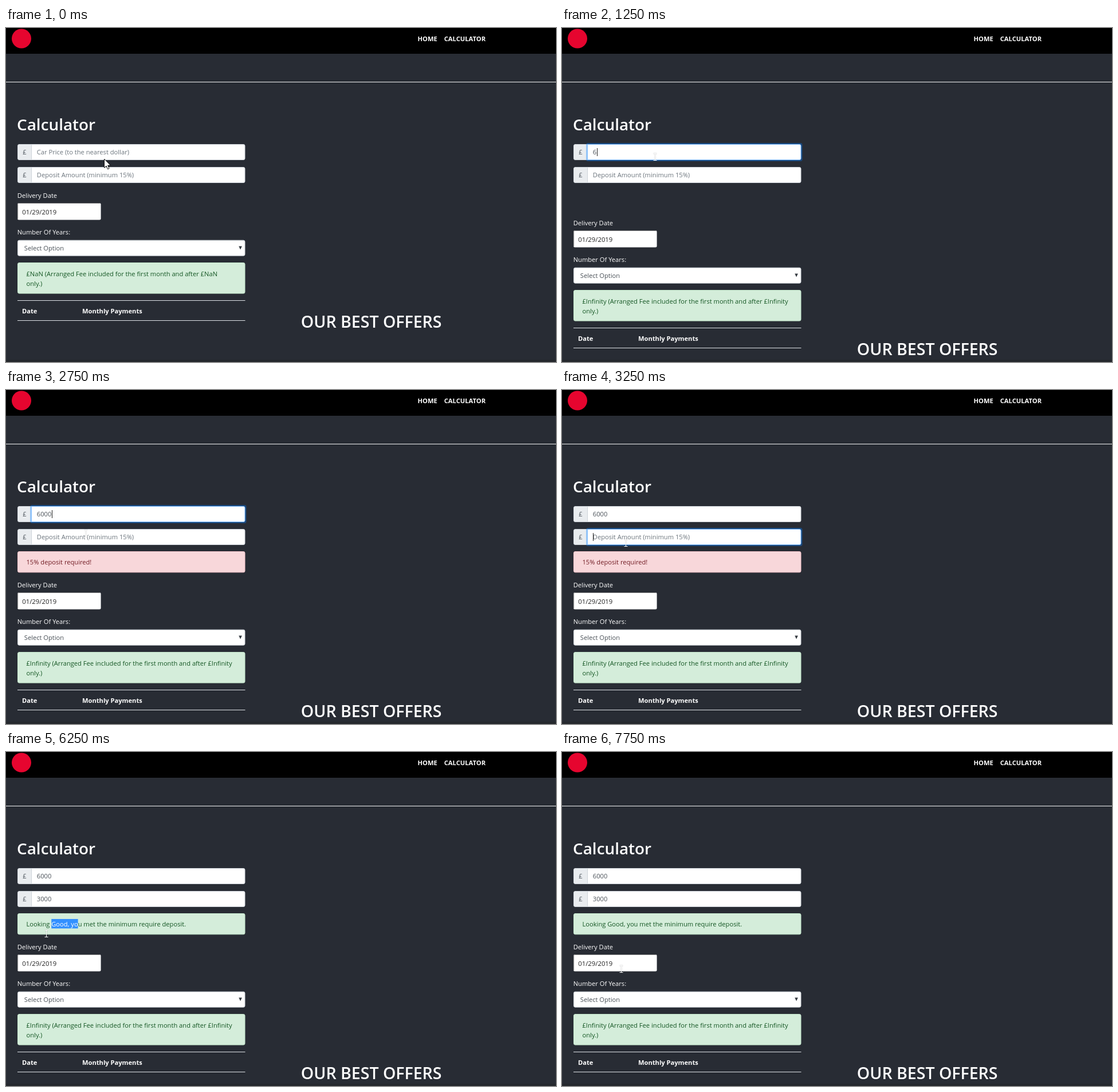
Write an HTML page that moves like this. It is 960x584 px and loops after 8 s.

```html
<!DOCTYPE html>
<html lang="en">
<head>
<meta charset="utf-8">
<title>Calculator</title>
<style>
  html, body { margin: 0; width: 100%; height: 100%; overflow: hidden; background: #282c34; }
  svg { display: block; width: 960px; height: 584px; }
  text { font: 11.15px "Open Sans", "Noto Sans", sans-serif; fill: #fff; white-space: pre; }
  .nav { font-size: 11.2px; font-weight: 700; }
  .title { font-size: 27.9px; font-weight: 600; }
  .bold { font-weight: 700; }
  .value { fill: #495057; }
  .hint { fill: #6c757d; }
  .addon { fill: #e9ecef; stroke: #ced4da; }
  .box { fill: #fff; stroke: #ced4da; }
  .focused .box { stroke: #80bdff; }
  .halo { fill: #007bff; opacity: 0; }
  .focused .halo { opacity: .35; }
  .caret { fill: #222; }
  .rule { fill: #dee2e6; }
  .success { fill: #d4edda; stroke: #c3e6cb; }
  .danger { fill: #f8d7da; stroke: #f5c6cb; }
  .success-text { fill: #155724; }
  .danger-text { fill: #721c24; }
  .selected { fill: #fff; }
</style>
</head>
<body>
<svg viewBox="0 0 960 584">
  <rect width="960" height="584" fill="#282c34"/>
  <rect width="960" height="45" fill="#000"/>
  <circle cx="27" cy="18.5" r="17" fill="#e6052f"/>
  <text class="nav" x="718.5" y="23">HOME</text>
  <text class="nav" x="764.7" y="23">CALCULATOR</text>
  <rect y="94" width="960" height="1" fill="#f4f4f4"/>
  <text class="title" x="19" y="179">Calculator</text>

  <g id="fields"></g>

  <g id="notice">
    <rect id="noticeBox" x="20.5" y="282.5" width="396.5" height="36.3" rx="2.5"/>
    <rect id="selection" y="292" height="16.5" fill="#3390ff"/>
    <text id="noticeText" x="35.5" y="305.3"><tspan></tspan><tspan class="selected"></tspan><tspan></tspan></text>
  </g>

  <g id="lower">
    <text x="19.7" y="296.8">Delivery Date</text>
    <rect x="20" y="306" width="145.6" height="29.4" rx="2.5" fill="#fff"/>
    <path d="M20.7 334V308q0-1.5 1.5-1.5H164" fill="none" stroke="#8d8d8d"/>
    <text x="28.3" y="325.7" style="fill:#222;font-size:11.3px">01/29/2019</text>
    <text x="19.7" y="361">Number Of Years:</text>
    <rect class="box" x="20.5" y="371.2" width="396.5" height="27" rx="2.5"/>
    <text class="value" x="31.8" y="389.3">Select Option</text>
    <path d="M406.3 381.5h5.6l-2.8 6z" fill="#343a40"/>
    <rect class="success" x="20.5" y="410.5" width="396.5" height="53.6" rx="2.5"/>
    <text id="fee" class="success-text" x="35.5" y="433.6"></text>
    <text class="success-text" x="35.5" y="451.3">only.)</text>
    <rect class="rule" x="20" y="476" width="397.5" height="1"/>
    <text class="bold" x="28" y="498.6">Date</text>
    <text class="bold" x="133" y="498.6">Monthly Payments</text>
    <rect class="rule" x="20" y="511" width="397.5" height="1"/>
    <text class="title" x="514.8" y="523.6" style="font-size:28.5px">OUR BEST OFFERS</text>
  </g>
  <rect y="580" width="960" height="4" fill="#25282d"/>

  <g id="pointer">
    <path id="arrow" d="M0 0V15.5L3.6 12.2 6 17.8 8.6 16.7 6.2 11.2H11z" fill="#fff" stroke="#000" stroke-width=".9"/>
    <g id="beam" fill="none" transform="translate(.5 .5)">
      <path d="M-3-6H3M0-6V6M-3 6H3" stroke="#000" stroke-opacity=".18" stroke-width="2"/>
      <path d="M-3-6H3M0-6V6M-3 6H3" stroke="#fff"/>
    </g>
  </g>
</svg>
<script>
const LOOP = 8000;
const SHIFT = 48;
const PRAISE = "Looking Good, you met the minimum require deposit.";
const WARNING = "15% deposit required!";
const $ = id => document.getElementById(id);

// Each cue changes only the listed parts of the state.
const cues = [
  [0, { mouse: [171.5, 229], arrow: true, focus: -1, caret: false, price: "", deposit: "",
        open: false, notice: "", select: [0, 0] }],
  [250, { mouse: [168, 223], arrow: false }],
  [500, { mouse: [163, 224], focus: 0, caret: true }],
  [1000, { mouse: [162, 225], caret: false }],
  [1250, { price: "6", caret: true, open: true }],
  [1500, { notice: WARNING }],
  [1750, { price: "60", mouse: [170, 228] }],
  [2000, { price: "600" }],
  [2250, { price: "6000" }],
  [2750, { mouse: [139, 250] }],
  [3000, { mouse: [113, 262], focus: 1 }],
  [3250, { mouse: [111, 267] }],
  [3500, { mouse: [114, 276] }],
  [3750, { deposit: "3", mouse: [116, 277] }],
  [4000, { deposit: "30" }],
  [4500, { deposit: "300" }],
  [4750, { caret: false }],
  [5500, { deposit: "3000", caret: true, notice: PRAISE }],
  [5750, { mouse: [127, 302], focus: -1, caret: false }],
  [6000, { mouse: [102, 309], select: [14, 16] }],
  [6250, { mouse: [70, 317], select: [8, 16] }],
  [6500, { mouse: [72, 322], select: [0, 0] }],
  [6750, { mouse: [84, 345] }],
  [7000, { mouse: [98, 368] }],
  [7250, { mouse: [110, 382] }],
  [7500, { mouse: [118, 388] }],
  [7750, { mouse: [103, 379] }]
];

function makeField(y, hint) {
  const group = document.createElementNS("http://www.w3.org/2000/svg", "g");
  group.innerHTML = `
    <rect class="addon" x="20.5" y="${y + .5}" width="60" height="27" rx="2.5"/>
    <text class="value" x="29.3" y="${y + 18.3}">£</text>
    <rect class="halo" x="42" y="${y - 2}" width="377.6" height="32" rx="3.5"/>
    <path class="box" d="M44.5 ${y + .5}H414.5q2.5 0 2.5 2.5v22q0 2.5 -2.5 2.5H44.5z"/>
    <text class="entry" x="53.8" y="${y + 18.3}"></text>
    <rect class="caret" y="${y + 7}" width="1" height="14"/>`;
  $("fields").append(group);
  const entry = group.querySelector(".entry");
  const caret = group.querySelector(".caret");
  return (value, focused, caretOn) => {
    group.setAttribute("class", focused ? "focused" : "");
    entry.textContent = value || hint;
    entry.setAttribute("class", "entry " + (value ? "value" : "hint"));
    const width = value ? entry.getComputedTextLength() : 0;
    caret.setAttribute("x", Math.round(54.3 + width));
    caret.style.display = focused && caretOn ? "" : "none";
  };
}

const showPrice = makeField(203, "Car Price (to the nearest dollar)");
const showDeposit = makeField(243, "Deposit Amount (minimum 15%)");

function showNotice(message, [from, to]) {
  $("notice").style.display = message ? "" : "none";
  const kind = message === PRAISE ? "success" : "danger";
  $("noticeBox").setAttribute("class", kind);
  $("noticeText").setAttribute("class", kind + "-text");
  const parts = [message.slice(0, from), message.slice(from, to), message.slice(to)];
  const spans = $("noticeText").children;
  parts.forEach((part, i) => spans[i].textContent = part);
  const before = from ? spans[0].getComputedTextLength() : 0;
  const width = to > from ? spans[1].getComputedTextLength() : 0;
  $("selection").setAttribute("x", 35.5 + before);
  $("selection").setAttribute("width", width);
}

function render(s) {
  showPrice(s.price, s.focus === 0, s.caret);
  showDeposit(s.deposit, s.focus === 1, s.caret);
  showNotice(s.notice, s.select);
  const sum = s.open ? "£Infinity" : "£NaN";
  $("fee").textContent = `${sum} (Arranged Fee included for the first month and after ${sum}`;
  $("lower").setAttribute("transform", `translate(0 ${s.open ? SHIFT : 0})`);
  $("pointer").setAttribute("transform", `translate(${s.mouse})`);
  $("arrow").style.display = s.arrow ? "" : "none";
  $("beam").style.display = s.arrow ? "none" : "";
}

let shown = -1;
function tick() {
  const time = performance.now() % LOOP;
  const past = cues.filter(([start]) => start <= time);
  if (past.length !== shown) {
    shown = past.length;
    render(Object.assign({}, ...past.map(cue => cue[1])));
  }
  requestAnimationFrame(tick);
}
tick();
</script>
</body>
</html>
```
